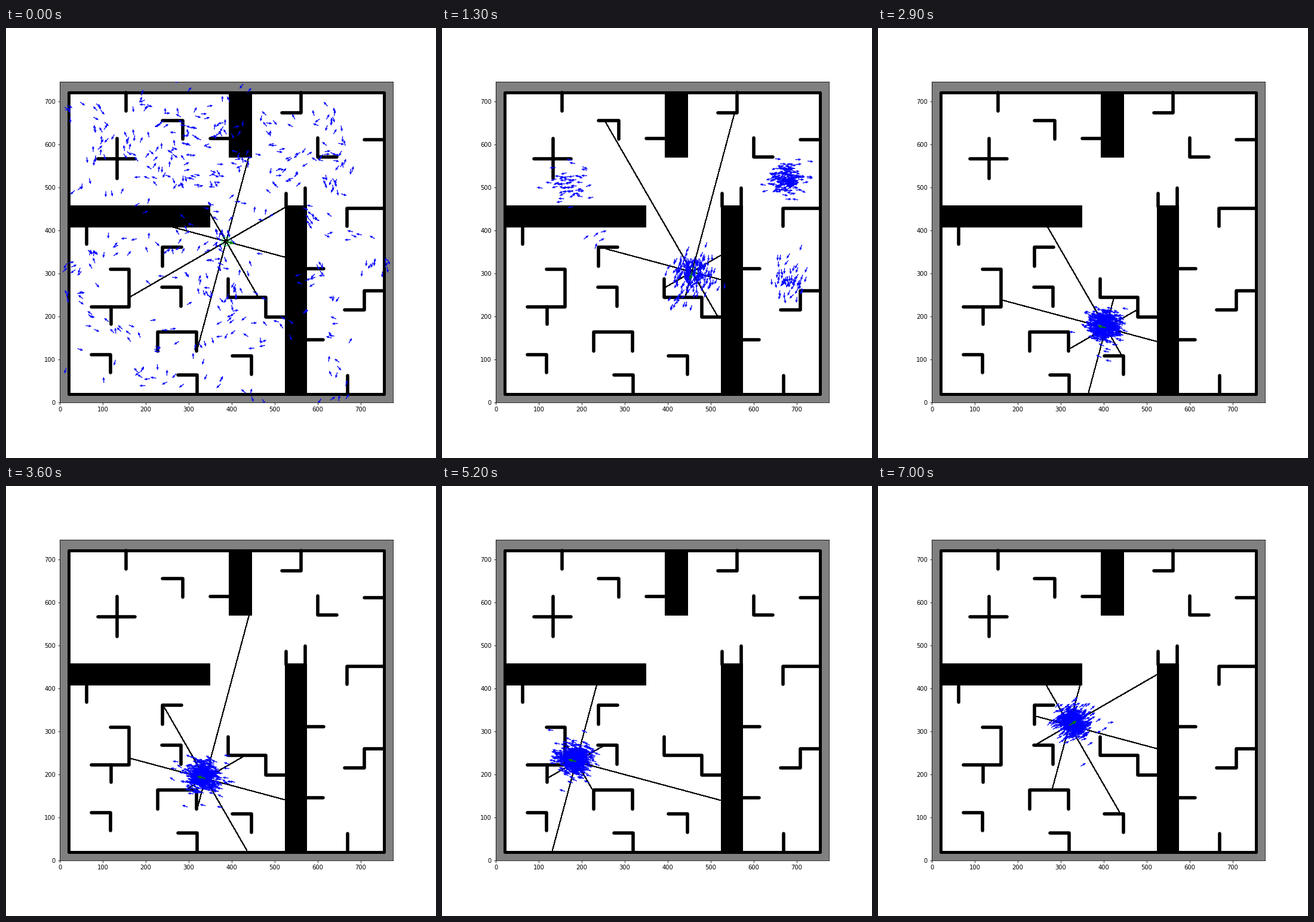
Animation of 720 by 720 pixels, one loop 7100 ms. Source, as a matplotlib script:

```python
import numpy as np
import matplotlib.pyplot as plt
from matplotlib.animation import FuncAnimation
from matplotlib.collections import LineCollection
from matplotlib.patches import Circle, Rectangle

FRAMES, INTERVAL = 71, 100
SIZE, DPI = 720, 72
MAP_W, MAP_H = 775, 746
SCALE = 0.72                  # screen pixels per map unit
COUNT = 500                   # particles
SPOTS = 160                   # small clumps of the first guess
HALF = 3.4                    # half thickness of a thin wall

ROOM = (21, 20, 753.5, 721)
BLOCKS = [(392.5, 571, 445.5, 721), (20, 409, 348, 458), (523, 20, 573.5, 459)]

# Thin walls: first direction, start x, start y, then alternating coordinates
WALLS = [
    ("v", 153.5, 721, 678), ("h", 239, 656, 285.5, 613),
    ("v", 133, 614, 521), ("h", 89, 567, 175.5),
    ("h", 350, 614.5, 393), ("v", 560.5, 721, 674, 516),
    ("v", 600, 615, 571.5, 645), ("h", 709, 611, 753),
    ("v", 62, 409, 368), ("v", 526.5, 456, 486), ("v", 571, 456, 499),
    ("h", 753, 452, 667.5, 410), ("h", 573, 311, 614),
    ("h", 753, 260, 708, 215, 662), ("h", 573, 146, 613),
    ("v", 669, 20, 62), ("h", 283, 360.5, 239.5, 317),
    ("h", 117.5, 310, 161, 222.5, 74), ("v", 119.5, 222.5, 182),
    ("h", 238, 268.5, 281.5, 224), ("v", 227.5, 119.5, 164.5, 317.5, 119.5),
    ("h", 74, 111.5, 118, 69), ("h", 275.5, 64, 319, 20),
    ("v", 391.5, 288, 244.5, 479.5, 198, 523), ("h", 402, 109, 446.5, 65),
]

# Robot route: corner times and places, and the heading on each leg
TIMES = [0, 7.8, 27.4, 53, 70]
ROUTE = np.array([387 + 374.5j, 469.5 + 352j, 420 + 169.6j,
                  177.6 + 232.4j, 320 + 314.6j])
HEADINGS = [-15, -105, 165, 30]

# Hypotheses at frame BASE: place, heading, spread x, spread y, flip chance,
# then shares at the times in SHARE_TIMES
BASE = 5
SHARE_TIMES = [5, 13, 19, 26]
GROUPS = [
    (220 + 537j, -90, 21, 18, 0.2, (0.26, 0.11, 0, 0)),
    (625 + 489j, 90, 19, 17, 0.35, (0.12, 0.34, 0.12, 0)),
    (666 + 338j, -15, 18, 28, 0, (0.11, 0.13, 0.04, 0)),
    (424 + 301j, -30, 18, 18, 0, (0.27, 0.02, 0, 0)),
    (443 + 363j, -15, 21, 20, 0, (0.11, 0.39, 0.84, 1)),
    (708 + 642j, 60, 18, 20, 0, (0.05, 0, 0, 0)),
    (433 + 517j, 60, 16, 18, 0, (0.05, 0, 0, 0)),
    (617 + 389j, 90, 12, 18, 0, (0.03, 0, 0, 0)),
    (198 + 321j, 120, 14, 16, 0, (0.015, 0.003, 0, 0)),
    (706 + 162j, 55, 14, 16, 0, (0.02, 0, 0, 0)),
]


def wall_path(axis, x, y, *moves):
    points = [(x, y)]
    for value in moves:
        x, y = (value, y) if axis == "h" else (x, value)
        axis = "v" if axis == "h" else "h"
        points.append((x, y))
    return points


def robot_place(n):
    return (np.interp(n, TIMES, ROUTE.real)
            + 1j * np.interp(n, TIMES, ROUTE.imag))


def robot_heading(n):
    leg = np.searchsorted(TIMES[1:-1], n)
    return HEADINGS[leg]


def unit(degrees):
    return np.exp(1j * np.radians(degrees))


def follow(place, heading, start, n):
    """Apply the robot's own motion since `start` to another pose."""
    turn = heading - robot_heading(start)
    shift = unit(turn) * (robot_place(n) - robot_place(start))
    return place + shift, robot_heading(n) + turn


paths = [wall_path(*wall) for wall in WALLS]


def solid_boxes():
    boxes = list(BLOCKS)
    left, low, right, top = ROOM
    corners = [(left, low), (right, low), (right, top), (left, top), (left, low)]
    for path in paths + [corners]:
        for (x0, y0), (x1, y1) in zip(path, path[1:]):
            boxes.append((min(x0, x1) - HALF, min(y0, y1) - HALF,
                          max(x0, x1) + HALF, max(y0, y1) + HALF))
    return np.array(boxes)


BOXES = solid_boxes()


def cast(origin, angle):
    """Return the point where a ray first meets a wall."""
    way = unit(angle)
    tx = (BOXES[:, [0, 2]] - origin.real) / way.real
    ty = (BOXES[:, [1, 3]] - origin.imag) / way.imag
    near = np.maximum(tx.min(axis=1), ty.min(axis=1))
    far = np.minimum(tx.max(axis=1), ty.max(axis=1))
    hits = near[(near <= far) & (near > 0)]
    return origin + way * hits.min()


def inside_block(x, y):
    return any(x0 < x < x1 and y0 < y < y1 for x0, y0, x1, y1 in BLOCKS)


def make_spots():
    rng = np.random.default_rng(12)
    places = []
    while len(places) < SPOTS:
        x, y = MAP_W * rng.beta(1.3, 1.5), MAP_H * rng.beta(1.4, 1.2)
        if not inside_block(x, y):
            places.append(x + 1j * y)
    return np.array(places), rng.uniform(0, 360, SPOTS)


SPOT_PLACES, SPOT_HEADINGS = make_spots()


def particles(n):
    """Return places and headings of all particles at frame n."""
    rng = np.random.default_rng(100 + n)
    loose = np.interp(n, [0, 1, 2, 3, 5, 8], [1, 0.65, 0.38, 0.2, 0.02, 0])
    spread_out = round(COUNT * loose)

    alive = max(6, int(SPOTS * loose))
    pick = rng.integers(0, alive, spread_out)
    spot_place, spot_heading = follow(SPOT_PLACES, SPOT_HEADINGS, 0, n)
    noise = rng.normal(0, 13, (2, spread_out))
    place_a = spot_place[pick] + noise[0] + 1j * noise[1]
    flips = 180 * (rng.random(spread_out) < 0.3)
    heading_a = spot_heading[pick] + rng.normal(0, 22, spread_out) + flips

    rest = COUNT - spread_out
    shares = np.array([np.interp(n, SHARE_TIMES, g[5]) for g in GROUPS])
    pick = rng.choice(len(GROUPS), rest, p=shares / shares.sum())
    poses = [follow(g[0], g[1], BASE, n) for g in GROUPS]
    place = np.array([p for p, _ in poses])[pick]
    heading = np.array([float(h) for _, h in poses])[pick]
    sx, sy, flip = (np.array([g[k] for g in GROUPS])[pick] for k in (2, 3, 4))

    tight = np.interp(n, [13, 27], [1, 0.82])
    tail = np.where(rng.random(rest) < 0.06, 1.9, 1) * tight
    noise = rng.normal(0, 1, (2, rest)) * tail
    place_b = place + sx * noise[0] + 1j * sy * noise[1]
    wobble = np.interp(n, [5, 13, 28], [15, 14, 8])
    heading_b = (heading + rng.normal(0, wobble, rest)
                 + 180 * (rng.random(rest) < flip))
    return (np.concatenate([place_a, place_b]),
            np.concatenate([heading_a, heading_b]))


def xy(z):
    return np.column_stack([np.real(z), np.imag(z)])


fig = plt.figure(figsize=(SIZE / DPI, SIZE / DPI), dpi=DPI, facecolor="white")
ax = fig.add_axes([90 / SIZE, 93 / SIZE,
                   MAP_W * SCALE / SIZE, MAP_H * SCALE / SIZE])
ax.set(xlim=(0, MAP_W), ylim=(0, MAP_H), facecolor="gray",
       xticks=range(0, 701, 100), yticks=range(0, 701, 100))
ax.tick_params(labelsize=10, labelfontfamily="DejaVu Sans")

left, low, right, top = ROOM
ax.add_patch(Rectangle((left, low), right - left, top - low, fc="white",
                       ec="black", lw=5, joinstyle="round", zorder=1))
for x0, y0, x1, y1 in BLOCKS:
    ax.add_patch(Rectangle((x0, y0), x1 - x0, y1 - y0, fc="black", ec="black",
                           lw=1, joinstyle="round", zorder=1.1))
ax.add_collection(LineCollection(paths, colors="black", linewidths=5.6,
                                 capstyle="round", joinstyle="round",
                                 zorder=1.2), autolim=False)

rays = LineCollection([], colors="black", linewidths=1, antialiaseds=False,
                      zorder=2)
ax.add_collection(rays, autolim=False)
ring = Circle((0, 0), 10, fill=False, ec="#00d060", lw=1, zorder=2.5)
ax.add_patch(ring)


def arrows(count, width, color, zorder):
    blank = np.zeros(count)
    return ax.quiver(blank, blank, blank + 1, blank, color=color, width=width,
                     headwidth=3.4, headlength=4, headaxislength=3.6,
                     units="dots", angles="xy", scale_units="xy", scale=1,
                     zorder=zorder)


swarm = arrows(COUNT, 1.3, "blue", 3)
pointer = arrows(1, 1.8, "green", 4)


def place_arrows(quiver, places, headings, length):
    vectors = length * unit(headings)
    quiver.set_offsets(xy(places))
    quiver.XY = xy(places)
    quiver.set_UVC(vectors.real, vectors.imag)


def update(n):
    spot, heading = robot_place(n), robot_heading(n)
    ends = [cast(spot, heading + 45 * k) for k in range(8)]
    rays.set_segments([xy([spot, end]) for end in ends])
    ring.center = spot.real, spot.imag
    place_arrows(pointer, np.array([spot]), np.array([heading]), 20)
    place_arrows(swarm, *particles(n), 14)
    return rays, ring, swarm, pointer


anim = FuncAnimation(fig, update, frames=FRAMES, interval=INTERVAL,
                     repeat=True, repeat_delay=0, blit=False)
plt.show()
```
